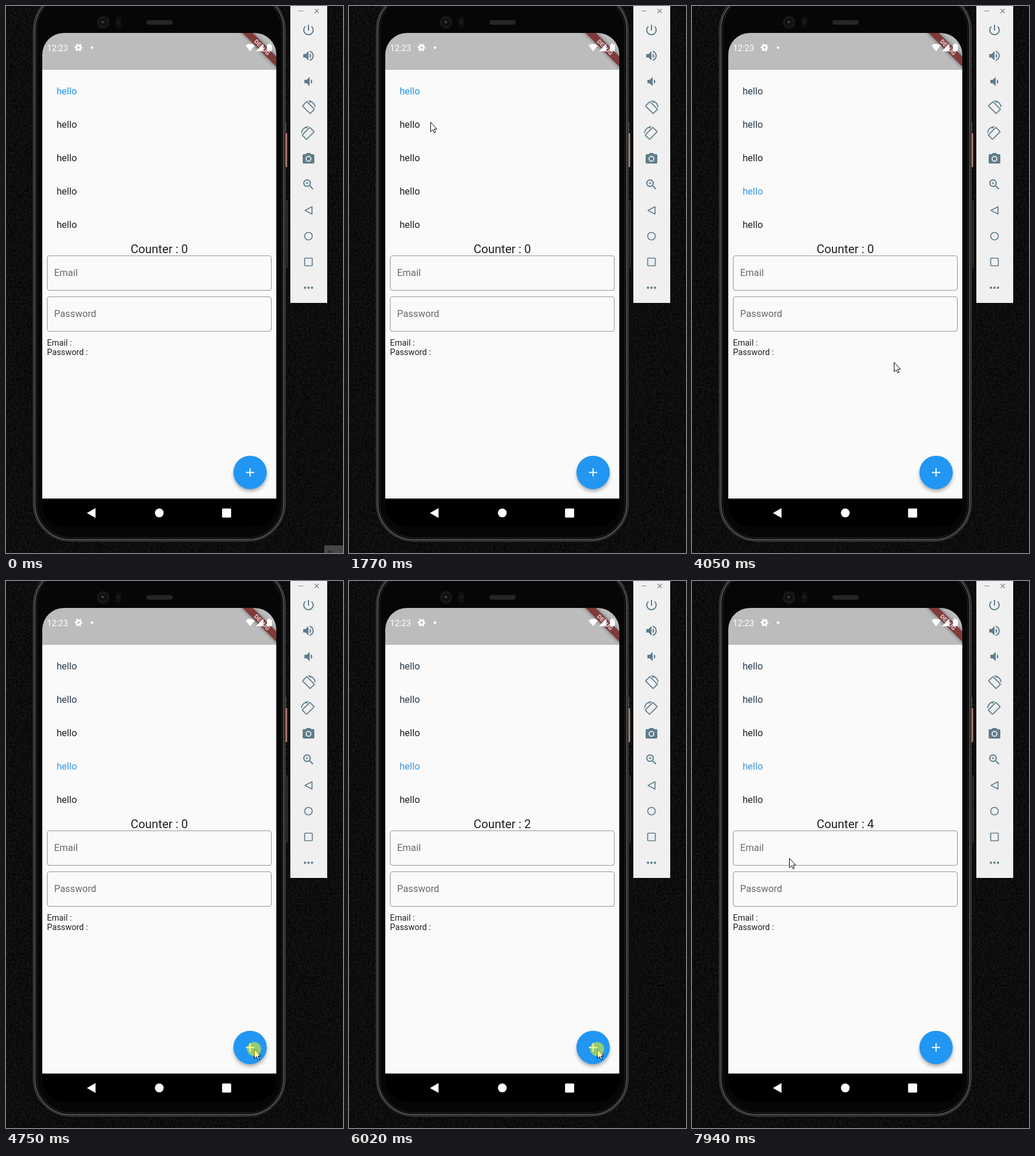
Recreate the animation shown at these times as an HTML page. Size 576 px wide and 934 px high, loop 8 s.

```html
<!DOCTYPE html>
<html lang="en">
<head>
<meta charset="utf-8">
<title>Phone emulator</title>
<style>
  html, body { margin: 0; width: 100%; height: 100%; overflow: hidden; background: #0e0e0e; }
  svg { position: absolute; left: 0; top: 0; width: 576px; height: 934px; }
  #wall { will-change: transform; }
  text { font-family: Roboto, "Liberation Sans", sans-serif; white-space: pre; }
  .tile { font-size: 16.3px; }
  .label { font-size: 16.3px; fill: #696969; }
  .small { font-size: 14.26px; fill: #212121; }
  .line { fill: none; stroke: #607d8b; stroke-width: 1.7; stroke-linejoin: round; }
</style>
</head>
<body>
<svg id="wall" viewBox="0 0 576 934">
  <filter id="leather" x="0" y="0" width="100%" height="100%" color-interpolation-filters="sRGB">
    <feTurbulence type="fractalNoise" baseFrequency=".28" numOctaves="2" seed="4"/>
    <feColorMatrix values=".12 0 0 0 -.008 .12 0 0 0 -.008 .12 0 0 0 -.008 0 0 0 0 1"/>
  </filter>
  <rect width="576" height="934" filter="url(#leather)"/>
</svg>

<svg viewBox="0 0 576 934">
  <defs>
    <clipPath id="screen"><rect x="62" y="46" width="400" height="843" rx="37"/></clipPath>
    <clipPath id="fabClip"><circle cx="417.2" cy="796.4" r="28.5"/></clipPath>
    <filter id="soft" x="-50%" y="-50%" width="200%" height="200%"><feGaussianBlur stdDeviation="3"/></filter>
    <radialGradient id="lens">
      <stop offset="0" stop-color="#2a3036"/><stop offset=".35" stop-color="#0b0d10"/>
      <stop offset=".75" stop-color="#161616"/><stop offset="1" stop-color="#1d1d1d"/>
    </radialGradient>
    <pattern id="mesh" width="3" height="3" patternUnits="userSpaceOnUse" patternTransform="rotate(30)">
      <rect width="3" height="3" fill="#1c1c1c"/><rect width="1.4" height="3" fill="#303030"/>
    </pattern>
  </defs>

  <!-- phone body -->
  <g stroke="#4c4c4c" fill="#141414">
    <rect x="475.5" y="198.5" width="3" height="16"/>
    <rect x="475.5" y="332.5" width="5" height="114" rx="1"/>
  </g>
  <rect x="476" y="217" width="4.5" height="58" fill="#b47f70"/>
  <rect x="46.5" y="-24" width="431" height="938" rx="64" fill="#262626" stroke="#484848"/>
  <rect x="49.5" y="-21" width="425" height="932" rx="61" fill="#060606" stroke="#606060" stroke-width="1.4"/>
  <rect x="52.5" y="-18" width="419" height="926" rx="58" fill="#060606" stroke="#181818" stroke-width="2"/>
  <circle cx="166" cy="28" r="10.5" fill="url(#lens)"/>
  <circle cx="165" cy="27" r="1.5" fill="#59626a"/>
  <rect x="187" y="18" width="10" height="20" rx="4" fill="#0f0f0f"/>
  <circle cx="192" cy="27" r="3.5" fill="#191919"/>
  <rect x="240.5" y="24.5" width="44" height="7" rx="3" fill="url(#mesh)" stroke="#222"/>

  <!-- app screen -->
  <g clip-path="url(#screen)">
    <rect x="62" y="46" width="400" height="843"/>
    <rect x="62" y="109" width="400" height="732" fill="#fafafa"/>
    <rect x="62" y="46" width="400" height="63" fill="#bcbcbc"/>
    <g transform="translate(462 46) rotate(45) scale(1.0185)">
      <rect x="-46" y="28" width="92" height="12" opacity=".5" filter="url(#soft)"/>
      <rect x="-46" y="28" width="92" height="12" fill="#803a3a"/>
      <text y="37.6" text-anchor="middle" font-size="10.2" font-weight="900" fill="#d9c5c5">DEBUG</text>
    </g>
    <g fill="#fff">
      <text x="70" y="76.6" font-size="14.5">12:23</text>
      <circle cx="124" cy="71" r="3.6" fill="none" stroke="#fff" stroke-width="3"/>
      <circle cx="124" cy="71" r="5.5" fill="none" stroke="#fff" stroke-width="2.4" stroke-dasharray="3 2.76" stroke-dashoffset="1.5"/>
      <circle cx="147" cy="71" r="2.3"/>
      <path d="M409.5 67.5Q417.3 61.5 425 67.5L417.3 77.2Z"/>
      <path d="M427 77.2L440 64.5V77.2Z"/>
      <path d="M446 66h2.3v-1.7h3.8V66h2.3v11.2H446Z"/>
    </g>

    <g id="tiles" class="tile"></g>
    <text id="counter" x="262" y="421.7" text-anchor="middle" font-size="20.37" fill="#212121"></text>
    <g fill="none" stroke="#969696" stroke-width="1.1">
      <rect x="70.5" y="426.5" width="383" height="59" rx="4"/>
      <rect x="70.5" y="496.5" width="383" height="59" rx="4"/>
    </g>
    <text class="label" x="82.3" y="461">Email</text>
    <text class="label" x="82.3" y="531.3">Password</text>
    <text class="small" x="70.1" y="580">Email :</text>
    <text class="small" x="70.1" y="596">Password :</text>

    <circle cx="417.2" cy="800.5" r="28" opacity=".34" filter="url(#soft)"/>
    <circle cx="417.2" cy="796.4" r="28.5" fill="#2196f3"/>
    <g clip-path="url(#fabClip)"><circle id="ripple" cx="424" cy="799" fill="#fff"/></g>
    <path d="M410.1 796.4h14.2M417.2 789.3v14.2" stroke="#fff" stroke-width="2"/>

    <g fill="#fff">
      <path d="M138.3 865.7L153 857.3V874.1Z"/>
      <circle cx="262" cy="865.6" r="7.5"/>
      <rect x="369.3" y="858" width="15.5" height="15.6" rx="1.5"/>
    </g>
  </g>

  <!-- emulator toolbar -->
  <rect x="486" y="0" width="63" height="507" fill="#f0f0f0"/>
  <path d="M500 8.5h8M527.5 5l7 7m0-7l-7 7" stroke="#7c8489" stroke-width="1.2"/>
  <g id="icons" fill="#607d8b" fill-rule="evenodd"></g>
  <g class="line">
    <path d="M511 349L523 342.7V355.3Z"/>
    <circle cx="517" cy="393" r="6.5"/>
    <rect x="510.5" y="430.5" width="13" height="13" rx="1"/>
  </g>
  <g fill="#607d8b"><circle cx="511" cy="481" r="2"/><circle cx="517" cy="481" r="2"/><circle cx="523" cy="481" r="2"/></g>

  <g id="corner">
    <rect x="544" y="921" width="32" height="13" fill="#464646"/>
    <text x="550" y="939" font-size="12" fill="#111">0</text>
  </g>

  <g id="cursor">
    <path d="M.5.5V16.5L4.2 13.2L6.7 18.5L9 17.5L6.6 12.2H11.3Z" fill="#fff" stroke="#000"/>
    <circle id="press" r="12" fill="#ff0" opacity=".5"/>
  </g>
</svg>

<script>
const LOOP = 8000;
const $ = id => document.getElementById(id);
const SVG = 'http://www.w3.org/2000/svg';

function add(parent, tag, attrs, text = '') {
  const node = document.createElementNS(SVG, tag);
  for (const key in attrs) node.setAttribute(key, attrs[key]);
  node.textContent = text;
  return parent.appendChild(node);
}

const icons = {
  41: 'M13 3h-2v10h2V3zm4.83 2.17l-1.42 1.42C17.99 7.86 19 9.81 19 12c0 3.87-3.13 7-7 7s-7-3.13-7-7c0-2.19 1.01-4.14 2.58-5.42L6.17 5.17C4.23 6.82 3 9.26 3 12c0 4.97 4.03 9 9 9s9-4.03 9-9c0-2.74-1.23-5.18-3.17-6.83z',
  85: 'M3 9v6h4l5 5V4L7 9H3zm13.5 3c0-1.77-1.02-3.29-2.5-4.03v8.05c1.48-.73 2.5-2.25 2.5-4.02zM14 3.23v2.06c2.89.86 5 3.54 5 6.71s-2.11 5.85-5 6.71v2.06c4.01-.91 7-4.49 7-8.77s-2.99-7.86-7-8.77z',
  129: 'M18.5 12c0-1.77-1.02-3.29-2.5-4.03v8.05c1.48-.73 2.5-2.25 2.5-4.02zM5 9v6h4l5 5V4L9 9H5z',
  261: 'M9 2L7.17 4H4a2 2 0 0 0-2 2v12a2 2 0 0 0 2 2h16a2 2 0 0 0 2-2V6a2 2 0 0 0-2-2h-3.17L15 2zM12 7a5 5 0 1 1 0 10a5 5 0 1 1 0-10zM12 8.8a3.2 3.2 0 1 0 0 6.4a3.2 3.2 0 1 0 0-6.4z',
  305: 'M15.5 14h-.79l-.28-.27A6.5 6.5 0 1 0 13.73 14.43l.27.28v.79l5 4.99L20.49 19zM9.5 5a4.5 4.5 0 1 1 0 9a4.5 4.5 0 1 1 0-9zM12 10h-2v2H9v-2H7V9h2V7h1v2h2z'
};
const rotation = 'M16.48 2.52c3.27 1.55 5.61 4.72 5.97 8.48h1.5C23.44 4.84 18.29 0 12 0l-.66.03 3.81 3.81zM10.23 1.75c-.59-.59-1.54-.59-2.12 0L1.75 8.11c-.59.59-.59 1.54 0 2.12l12.02 12.02c.59.59 1.54.59 2.12 0l6.36-6.36c.59-.59.59-1.54 0-2.12zm4.6 19.44L2.81 9.17l6.36-6.36 12.02 12.02z';

const addIcon = (d, transform, attrs = {}) => add($('icons'), 'path', { d, transform, ...attrs });
for (const y in icons) addIcon(icons[y], `translate(505 ${y - 12})`);
const bold = { stroke: '#607d8b', 'stroke-width': .4 };
addIcon(rotation, 'translate(505 161.5)', bold);
addIcon(rotation, 'translate(528.5 205.5) scale(-1 1)', bold);

const tiles = [0, 1, 2, 3, 4].map(i => add($('tiles'), 'text', { x: 86.4, y: 151 + i * 57 }, 'hello'));

// Bursts of movement: start, end, number of steps
const bursts = [
  [530, 940, 7], [1140, 1770, 10], [2170, 2940, 12], [3010, 3500, 8], [3640, 4400, 12],
  [4470, 5140, 10], [5470, 5820, 6], [6020, 6380, 6], [6710, 7460, 12], [7530, 7940, 6]
];
// Cursor tip: time, x, y
const path = [
  [530, 562, 914], [940, 255, 304], [1075, 255, 304], [1770, 139, 198], [2450, 139, 198],
  [2792, 231, 410], [2940, 243, 421], [3500, 181, 317], [3780, 181, 317], [4055, 345, 608],
  [4400, 403, 749], [4540, 428, 812], [4690, 424, 799], [6900, 424, 799], [6970, 420, 812],
  [7460, 171, 520], [7600, 177, 508], [7940, 166, 473]
];
const taps = [[2170, 2380], [3640, 3780]];
const clicks = [[4750, 4910], [5470, 5600], [6020, 6150], [6710, 6840]];

const INK = [33, 33, 33], SLATE = [40, 59, 77];
const BLUES = { 0: [33, 150, 243], 1: [74, 157, 214], 3: [60, 151, 224] };
const clamp = v => Math.max(0, Math.min(1, v));
const mix = (a, b, k) => a + (b - a) * k;
const blend = (a, b, k) => `rgb(${a.map((v, i) => Math.round(mix(v, b[i], k)))})`;

function stepped(t) {
  let held = 0;
  for (const [start, end, count] of bursts) {
    if (t < start) break;
    const gap = (end - start) / (count - 1);
    held = Math.min(end, start + Math.floor((t - start) / gap + .3) * gap);
  }
  return held;
}

function cursorAt(t) {
  const i = path.findIndex(p => p[0] >= t);
  if (i < 0) return path.at(-1).slice(1);
  if (i === 0) return path[0].slice(1);
  const [t0, x0, y0] = path[i - 1], [t1, x1, y1] = path[i];
  const k = (t - t0) / (t1 - t0), e = k * (2 - k);
  return [Math.round(mix(x0, x1, e)), Math.round(mix(y0, y1, e))];
}

function draw(time) {
  const t = stepped(time);
  $('corner').style.display = time < 70 ? '' : 'none';
  $('cursor').style.display = time < 530 ? 'none' : '';
  $('cursor').setAttribute('transform', `translate(${cursorAt(t)})`);
  const down = [...taps, ...clicks].some(([a, b]) => t >= a && t < b);
  $('press').style.display = down ? '' : 'none';

  const second = clamp((t - taps[0][1]) / 200), fourth = clamp((t - taps[1][1]) / 200);
  const fills = [
    blend(BLUES[0], SLATE, second),
    fourth ? blend(BLUES[1], SLATE, fourth) : blend(INK, BLUES[1], second),
    blend(INK, INK, 0),
    blend(INK, BLUES[3], fourth),
    blend(INK, INK, 0)
  ];
  tiles.forEach((tile, i) => tile.setAttribute('fill', fills[i]));

  const label = 'Counter : ' + clicks.filter(c => t >= c[1]).length;
  if ($('counter').textContent !== label) $('counter').textContent = label;

  const last = clicks.filter(c => t >= c[0]).at(-1);
  const grow = last ? clamp((t - last[0] - 30) / 220) : 0;
  const fade = last ? 1 - clamp((t - last[1]) / 220) : 0;
  $('ripple').setAttribute('r', 38 * grow);
  $('ripple').setAttribute('opacity', .24 * fade);
}

const begin = performance.now();
function tick() {
  draw((performance.now() - begin) % LOOP);
  requestAnimationFrame(tick);
}
tick();
</script>
</body>
</html>
```
